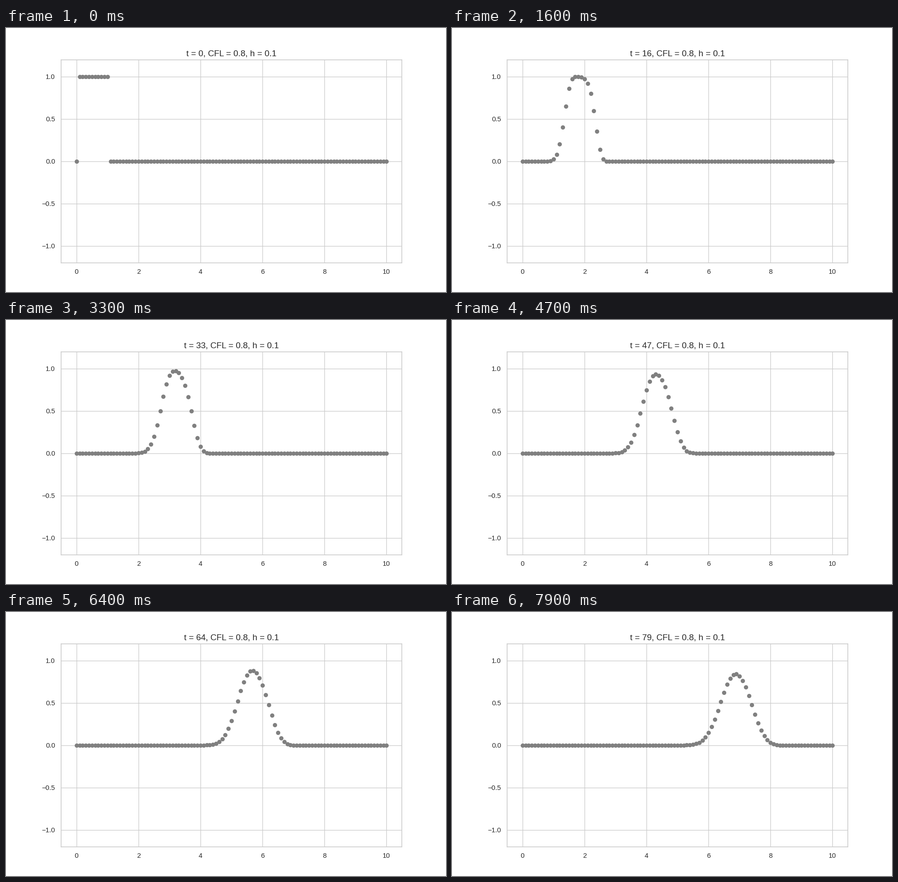
A matplotlib script for the animation above (8000 ms loop, 966 by 580 pixels).

```python
import matplotlib.pyplot as plt
import numpy as np
from matplotlib.animation import FuncAnimation

WIDTH, HEIGHT, DPI = 966, 580, 128
PT = 96.6 / DPI          # sizes below are meant for a 10 x 6 inch layout
CFL, H, STEPS = 0.8, 0.1, 80

plt.rcParams["font.family"] = "Liberation Sans"
INK, LINE = "0.15", "0.8"


def advect(steps):
    """First-order upwind solution of a square pulse, one row per step."""
    x = np.linspace(0, 10, 101)
    u = np.zeros((steps, x.size))
    u[0, 1:11] = 1
    for n in range(1, steps):
        u[n, 1:] = (1 - CFL) * u[n - 1, 1:] + CFL * u[n - 1, :-1]
    return x, u


x, u = advect(STEPS)

fig = plt.figure(figsize=(WIDTH / DPI, HEIGHT / DPI), dpi=DPI, facecolor="white")
ax = fig.add_axes([0.125, 0.11, 0.775, 0.77])
ax.set(xlim=(-0.5, 10.5), ylim=(-1.2, 1.2),
       xticks=np.arange(0, 11, 2), yticks=np.arange(-1, 1.1, 0.5))
ax.set_axisbelow(True)
ax.grid(color=LINE, linewidth=PT)
ax.tick_params(length=0, pad=9.5 * PT, labelsize=11 * PT, labelcolor=INK)
for spine in ax.spines.values():
    spine.set(color=LINE, linewidth=1.25 * PT)

dots, = ax.plot(x, u[0], "o", color="gray", markersize=6 * PT,
                markeredgewidth=PT)
title = ax.set_title("", fontsize=14 * PT, pad=6 * PT, color=INK)


def update(n):
    dots.set_ydata(u[n])
    title.set_text(f"t = {n}, CFL = {CFL}, h = {H}")
    return dots, title


anim = FuncAnimation(fig, update, frames=STEPS, interval=100,
                     repeat=True, repeat_delay=0, blit=False)
plt.show()
```
